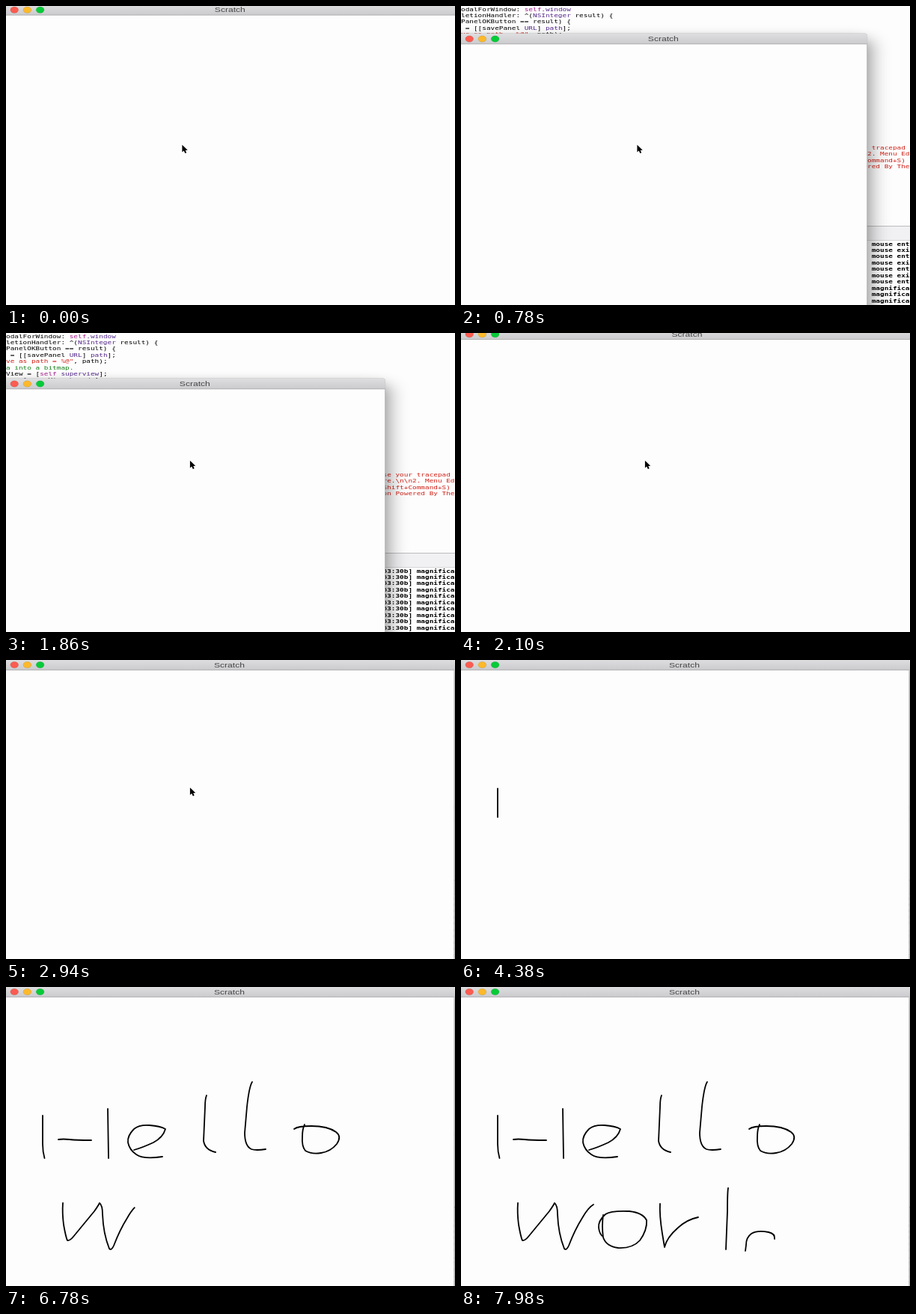
Animation, 600 px wide and 400 px high, one loop 8 s. Source, as an HTML page:

```html
<!DOCTYPE html>
<html lang="en">
<head>
<meta charset="utf-8">
<title>Drawing window</title>
<style>
  html, body { margin: 0; width: 100%; height: 100%; overflow: hidden; background: #fdfdfd; }
  svg { display: block; width: 600px; height: 400px; }
  text { white-space: pre; }
  .mono { font: 7.06px "DejaVu Sans Mono", monospace; }
  .log { font-weight: bold; }
  .title { font: 9.1px "Liberation Sans", Arial, sans-serif; fill: #444; text-anchor: middle; }
  .ink { fill: none; stroke: #000; stroke-width: 1.8; stroke-linecap: round; stroke-linejoin: round; }
</style>
</head>
<body>
<svg id="stage" viewBox="0 0 600 400">
  <defs>
    <linearGradient id="bar" x1="0" y1="0" x2="0" y2="1">
      <stop offset="0" stop-color="#dedee0"/>
      <stop offset="1" stop-color="#cbcbce"/>
    </linearGradient>
    <filter id="blur" filterUnits="userSpaceOnUse" x="-100" y="-80" width="840" height="620">
      <feGaussianBlur stdDeviation="15 9"/>
    </filter>
  </defs>
  <rect width="600" height="400" fill="#fdfdfd"/>
  <g id="editor"></g>
  <rect y="294" width="600" height="19" fill="#f1f1f3"/>
  <path d="M0 294.5H600" stroke="#bcbcbe"/>
  <path d="M0 313.5H600" stroke="#d6d6d8"/>
  <g id="console"></g>
  <rect id="shadow" x="-60" opacity=".56" filter="url(#blur)"/>
  <g id="win">
    <rect id="pane" x="-2" height="480" rx="2.5" fill="#fdfdfd" stroke="#a4a4a4" stroke-width=".6"/>
    <path id="head" fill="url(#bar)"/>
    <path id="rule" stroke="#a6a6a8" stroke-width=".8"/>
    <g id="lights"></g>
    <text id="name" class="title">Scratch</text>
  </g>
  <g id="drawing"></g>
  <path id="cursor" d="M0 0V9.8L2.3 7.8L3.9 11.2L5.8 10.4L4.3 7.2L7.3 7Z" stroke="#fff" stroke-width="1" paint-order="stroke"/>
</svg>
<script>
const LOOP = 8000, STEP = 60;
const WIDE = 1.33;
const RED = '#d02218', GREEN = '#13801a', PINK = '#aa1d91', PURPLE = '#54288c';
const $ = id => document.getElementById(id);

function add(parent, tag, attrs) {
  const el = document.createElementNS('http://www.w3.org/2000/svg', tag);
  for (const k in attrs) el.setAttribute(k, attrs[k]);
  parent.appendChild(el);
  return el;
}
function set(id, attrs) {
  for (const k in attrs) $(id).setAttribute(k, attrs[k]);
}
const place = (x, y) => `translate(${x} ${y}) scale(${WIDE} 1)`;

// Each run is a string or [string, colour].
function line(parent, x, y, runs, cls = 'mono') {
  const el = add(parent, 'text', { class: cls, transform: place(x, y) });
  for (const run of runs) {
    const [str, fill] = Array.isArray(run) ? run : [run, '#000'];
    add(el, 'tspan', { fill }).textContent = str;
  }
  return el;
}

const code = [
  ['odalForWindow: ', ['self', PINK], ['.window', PURPLE]],
  ['letionHandler: ^(', ['NSInteger', PURPLE], ' result) {'],
  ['PanelOKButton == result) {'],
  [' = [[savePanel ', ['URL', PURPLE], '] ', ['path', PURPLE], '];'],
  [['ve as path = %@"', RED], ', path);'],
  [['a into a bitmap.', GREEN]],
  ['View = [', ['self', PINK], ' ', ['superview', PURPLE], '];'],
  ['s = [superView ', ['bounds', PURPLE], '];'],
  ['Rep = [superView ', ['bitmap', PURPLE], '];'],
  ['superView ', ['cache', PURPLE], ': bounds];'],
  ['ta writeToFile: path];']
];
code.forEach((runs, i) => line($('editor'), 0, 6.5 + 8.4 * i, runs));

const RIGHT_TEXT = 464;
const help = [
  ': "1. Use your tracepad to d',
  'a picture.\\n\\n2. Menu Edit',
  ' Save (Shift+Command+S) to f',
  'plication Powered By Theo L'
];
help.forEach((s, i) => line($('editor'), RIGHT_TEXT, 191.7 + 8.4 * i, [[s, RED]]));

const ROWS = 10, PREFIX = 'atch[4163:30b] ';
const logRows = Array.from({ length: ROWS }, (_, i) =>
  line($('console'), RIGHT_TEXT, 320.5 + 8.45 * i, [''], 'mono log').firstChild);

// Log entries by index: mouse events, then pinches, then drawing.
function entry(i, pinches) {
  if (i < ROWS) return i % 2 ? 'mouse entered' : 'mouse exited';
  if (i < ROWS + pinches) return 'magnification';
  return (i - pinches) % 3 ? 'draw mode' : 'mouse exited';
}

['#fc5b50', '#fdb92a', '#06cb38'].forEach((fill, i) =>
  add($('lights'), 'ellipse', { cx: 11.2 + 17.2 * i, cy: 7, rx: 5.4, ry: 4.2, fill, stroke: '#555', 'stroke-opacity': .3, 'stroke-width': .5 }));

// Path, start and end time of every pen stroke.
const strokes = [
  ['M49 172V210Q49 220 51.5 229', 4320, 4410],
  ['M70 204Q76 203 85 204T114 205', 4555, 4625],
  ['M136 163L137 229', 4770, 4875],
  ['M171 218Q182 215 197 208Q210 201 213 190Q206 186 192 185Q178 184 171 190Q162 199 163 208Q165 218 174 224Q184 231 209 227', 5020, 5270],
  ['M268 145Q266 150 266 160L264 206Q266 218 280 221', 5415, 5560],
  ['M329 127Q325 133 322 160L319 195Q319 213 328 217Q334 219 347 217', 5700, 5855],
  ['M399 184Q396 190 396 200Q395 213 400 219Q408 224 421 222Q434 220 442 210Q449 200 441 194Q430 186 408 186Q390 186 385 190', 6000, 6275],
  ['M76 289Q75 302 77 318Q80 335 82 339Q85 340 90 334L118 300Q123 293 125 289Q129 292 129 304Q130 330 138 350Q141 353 144 346Q152 325 162 309Q170 295 177 291', 6420, 6790],
  ['M190 305Q188 320 190 335Q194 347 210 349Q229 350 239 339Q249 325 248 312Q243 302 225 300Q200 299 193 304Q183 313 184 322Q185 331 190 334', 6935, 7210],
  ['M266 290Q265 305 269 330L272 348Q275 335 290 322Q302 311 317 308', 7355, 7550],
  ['M357 269Q356 275 356 300L354 351', 7690, 7820],
  ['M419 337Q420 330 411 328Q396 325 388 330Q381 335 381 345L380 353', 7880, 7980]
].map(([d, from, to]) => ({ from, to, el: add($('drawing'), 'path', { d, class: 'ink', pathLength: 1 }) }));

const clamp = v => Math.max(0, Math.min(1, v));
const part = (t, a, b) => clamp((t - a) / (b - a));

// Window top over time; the lower left corner stays put.
const tops = [[0, -1.7], [600, -1.7], [780, 37], [1020, 80], [1260, 90], [1560, 90],
  [1860, 61], [2100, -5.2], [2220, -14], [2400, -14], [2940, -.5], [LOOP, -.5]];
function topAt(t) {
  const i = Math.max(1, tops.findIndex(k => k[0] > t));
  const [a, p] = tops[i - 1], [b, q] = tops[i];
  return p + (q - p) * part(t, a, b);
}

function draw(ms) {
  const t = Math.floor(ms / STEP) * STEP;
  const top = topAt(t), right = 598.1 - 1.5 * top;

  set('shadow', { y: top + 9, width: right + 60, height: 480 });
  set('win', { transform: `translate(0 ${top})` });
  set('pane', { width: right + 2 });
  set('head', { d: `M-2 14V0H${right - 2.5}Q${right} 0 ${right} 2.5V14Z` });
  set('rule', { d: `M-2 13.8H${right}` });
  set('name', { transform: place((right - 2) / 2, 10) });

  const pinches = Math.round(part(t, 600, 3180) * 43);
  const extra = Math.round(part(t, 3420, 3840) * 7);
  logRows.forEach((row, i) => {
    row.textContent = PREFIX + entry(i + pinches + extra, pinches);
  });

  const move = part(t, 1500, 1680);
  set('cursor', {
    transform: `translate(${235.4 + 10.5 * move} ${185.8 - 15 * move})`,
    visibility: t < 3660 ? 'visible' : 'hidden'
  });

  for (const { from, to, el } of strokes) {
    const p = part(t, from, to);
    el.setAttribute('visibility', p > 0 ? 'visible' : 'hidden');
    el.setAttribute('stroke-dasharray', p < 1 ? `${p} 2` : 'none');
  }
}

const begin = performance.now();
function tick() {
  draw((performance.now() - begin) % LOOP);
  requestAnimationFrame(tick);
}
draw(0);
requestAnimationFrame(tick);
</script>
</body>
</html>
```
